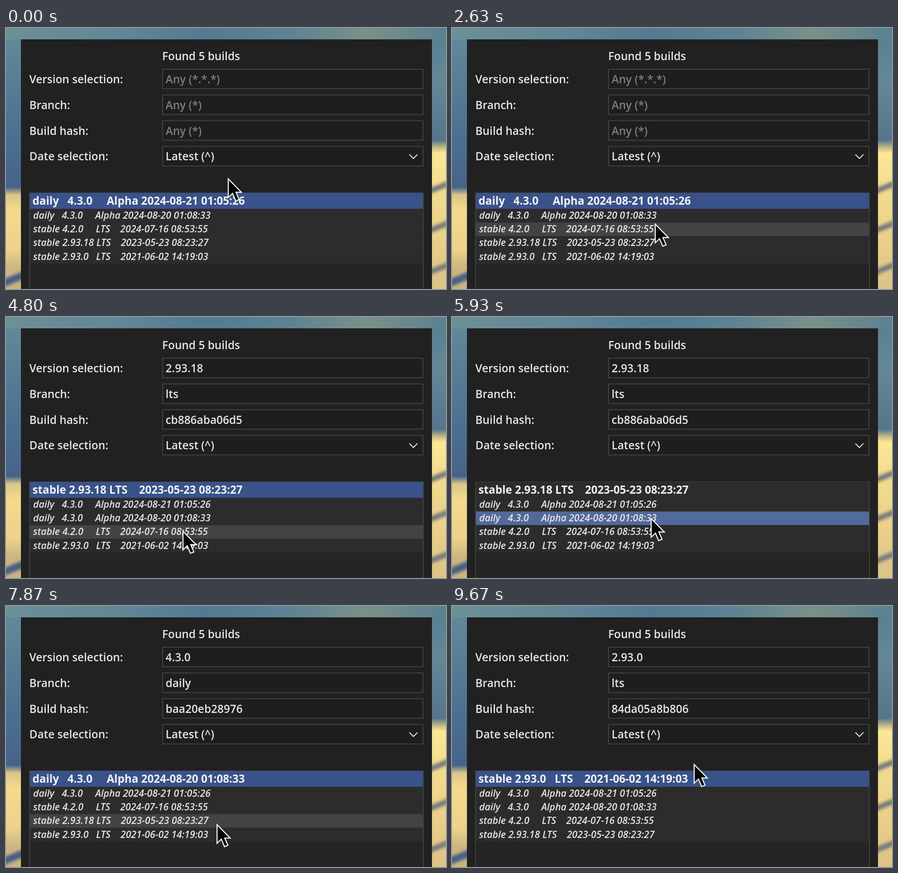
An HTML page with a canvas for the animation above (9970 ms loop, 972 by 576 pixels).

```html
<!DOCTYPE html>
<html lang="en">
<head>
<meta charset="utf-8">
<title>Build selection</title>
<style>
  html, body { margin: 0; height: 100%; overflow: hidden; background: #222; }
  canvas { display: block; }
</style>
</head>
<body>
<canvas id="stage" width="972" height="576"></canvas>
<script>
const ctx = document.getElementById('stage').getContext('2d');
const LOOP = 9970;
const FAMILY = '"Open Sans", "Noto Sans", sans-serif';
const LABEL = '600 24.4px', TOP_ROW = 'bold 24.2px', ROW = 'italic 600 21.2px';

const builds = [
  { text: 'daily   4.3.0     Alpha 2024-08-21 01:05:26' },
  { text: 'daily   4.3.0     Alpha 2024-08-20 01:08:33', fields: ['4.3.0', 'daily', 'baa20eb28976'] },
  { text: 'stable 4.2.0     LTS    2024-07-16 08:53:55' },
  { text: 'stable 2.93.18 LTS    2023-05-23 08:23:27', fields: ['2.93.18', 'lts', 'cb886aba06d5'] },
  { text: 'stable 2.93.0   LTS    2021-06-02 14:19:03', fields: ['2.93.0', 'lts', '84da05a8b806'] }
];
const hints = ['Any (*.*.*)', 'Any (*)', 'Any (*)'];
const labels = ['Version selection:', 'Branch:', 'Build hash:', 'Date selection:'];

// Each double click presses a build, then applies it on the second press.
const clicks = [{ at: 3330, build: 3 }, { at: 5930, build: 1 }, { at: 8570, build: 4 }];
const SECOND_PRESS = 230, RIPPLE = 320;

// Pointer path: time, x, y
const path = [
  [0, 491, 332], [30, 491, 332], [500, 498, 334], [970, 499, 335], [1170, 500, 336],
  [1700, 482, 395], [2130, 462, 412], [2630, 449, 432], [2770, 446, 440], [2930, 446, 440],
  [3130, 444, 473], [3900, 444, 473], [4300, 428, 480], [4800, 391, 472], [4930, 391, 472],
  [5300, 408, 452], [5600, 440, 444], [6730, 440, 444], [6900, 449, 458], [7130, 458, 478],
  [7730, 458, 478], [8370, 524, 507], [9370, 524, 507], [9670, 535, 349], [LOOP, 535, 349]
];

function pointerAt(t) {
  const i = path.findIndex(p => p[0] > t);
  const [t0, x0, y0] = path[i - 1], [t1, x1, y1] = path[i];
  const u = (t - t0) / (t1 - t0), k = u * u * (3 - 2 * u);
  return [x0 + (x1 - x0) * k, y0 + (y1 - y0) * k];
}

function rect(x, y, w, h, fill) {
  ctx.fillStyle = fill;
  ctx.fillRect(x, y, w, h);
}

function frame(x, y, w, h, color) {
  ctx.strokeStyle = color;
  ctx.lineWidth = 2;
  ctx.strokeRect(x, y, w, h);
}

function text(str, x, y, font, color = '#e6e6e6') {
  ctx.font = `${font} ${FAMILY}`;
  ctx.fillStyle = color;
  ctx.fillText(str, x, y);
}

function gradient(x1, y1, stops) {
  const g = ctx.createLinearGradient(0, 0, x1, y1);
  stops.forEach(([at, color]) => g.addColorStop(at, color));
  return g;
}

const sky = gradient(972, 0, [[0, '#6b9098'], [.25, '#628796'], [.45, '#547a93'], [.65, '#5d8393'], [.82, '#7a9189'], [1, '#5a8090']]);
const leftSide = gradient(0, 576, [[0, '#648b9a'], [.2, '#587e95'], [.45, '#4a6d90'], [.61, '#46638a'], [.64, '#dcc688'],
  [.7, '#f3da8c'], [.85, '#ecd28b'], [.92, '#cbb582'], [1, '#c9b482']]);
const rightSide = gradient(0, 576, [[0, '#567f91'], [.2, '#648896'], [.43, '#56758c'], [.46, '#c8bf86'],
  [.48, '#fbe795'], [.6, '#f3dc8e'], [.8, '#ead089'], [1, '#dcc286']]);

// Soft shadow stripe that rises to the right
function stripe(x, y, width, color) {
  ctx.beginPath();
  ctx.moveTo(x - 10, y + 9);
  ctx.lineTo(x + 42, y - 12);
  ctx.strokeStyle = color;
  ctx.lineWidth = width;
  ctx.stroke();
}

function drawBackground() {
  rect(0, 0, 972, 26, sky);
  rect(0, 25, 33, 551, leftSide);
  rect(941, 25, 31, 551, rightSide);
  ctx.filter = 'blur(3px)';
  for (const y of [353, 440, 532]) stripe(941, y, 12, '#767a7d');
  stripe(0, 556, 16, '#4a5f84');
  ctx.filter = 'none';
}

function drawDialog(fields) {
  rect(33, 25, 908, 551, '#212121');
  text('Found 5 builds', 345, 71, LABEL);
  labels.forEach((label, i) => {
    const top = 91 + i * 56.8;
    text(label, 51.5, top + 31, LABEL);
    rect(346, top, 575, 43, '#1e1e1e');
    frame(346, top, 575, 43, '#424242');
    const value = i === 3 ? 'Latest (^)' : fields ? fields[i] : '';
    text(value || hints[i], 352.5, top + 31, LABEL, value ? '#e6e6e6' : '#7d7d7d');
  });
  ctx.beginPath();
  ctx.moveTo(891, 279);
  ctx.lineTo(900, 288);
  ctx.lineTo(909, 279);
  ctx.strokeStyle = '#e6e6e6';
  ctx.stroke();
}

const rowTop = i => i ? 399 + (i - 1) * 30.2 : 364;

function drawList(order, selected, [px, py]) {
  rect(52, 364, 870, 220, '#252525');
  frame(52, 364, 870, 230, '#404040');
  order.forEach((build, i) => {
    const top = rowTop(i), h = rowTop(i + 1) - top;
    const hover = px > 52 && px < 922 && py >= top && py < top + h;
    const colors = i === selected ? ['#39528a', '#526a9b'] : ['#2c2c2c', '#434343'];
    rect(53, top, 868, h, colors[+hover]);
    if (i) text(builds[build].text, 60, top + 22, ROW);
    else text(builds[build].text, 58.5, 390, TOP_ROW, '#f2f2f2');
  });
}

function drawRipple(x, y, age) {
  const grow = age / 130;
  ctx.strokeStyle = '#e0142c';
  ctx.lineWidth = 1.3;
  ctx.globalAlpha = Math.min(1, (RIPPLE - age) / 150);
  for (const r of [30, 25, 19]) {
    ctx.beginPath();
    ctx.arc(x, y, r * Math.min(grow, 1.25), 0, 7);
    ctx.stroke();
  }
  ctx.globalAlpha = 1;
}

const arrow = new Path2D('M0 1V42L9.5 33L16.5 49.5L24 46.5L17 30.5H29Z');

function drawPointer([x, y]) {
  ctx.save();
  ctx.translate(x, y);
  ctx.fillStyle = '#050505';
  ctx.fill(arrow);
  ctx.strokeStyle = '#f4f4f4';
  ctx.lineWidth = 2.4;
  ctx.stroke(arrow);
  ctx.restore();
}

function draw(t) {
  const pointer = pointerAt(t);
  const click = clicks.findLast(c => t >= c.at);
  const applied = clicks.findLast(c => t >= c.at + SECOND_PRESS);
  const first = applied ? applied.build : 0;
  const order = [first, ...builds.keys()].filter((b, i) => !i || b !== first);
  const selected = click ? order.indexOf(click.build) : 0;

  drawBackground();
  drawDialog(builds[first].fields);
  drawList(order, selected, pointer);
  if (click) {
    const since = t - click.at;
    const age = since < SECOND_PRESS ? since : since - SECOND_PRESS;
    if (age < RIPPLE) drawRipple(pointer[0] - 2, pointer[1] - 3, age);
  }
  drawPointer(pointer);
}

function tick() {
  draw(performance.now() % LOOP);
  requestAnimationFrame(tick);
}
tick();
</script>
</body>
</html>
```
